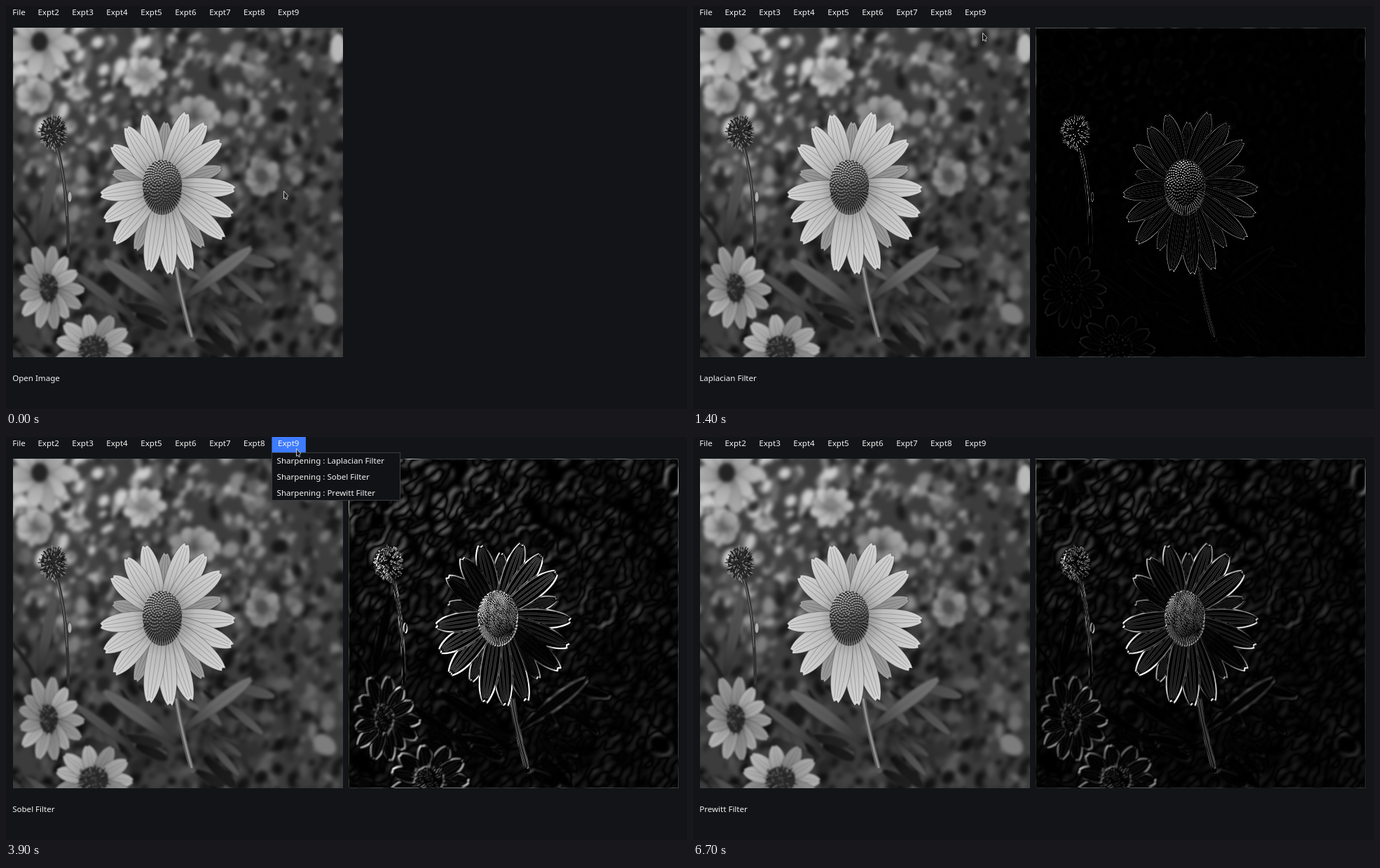
Write an HTML page with a canvas that moves like this. It is 972 by 576 pixels and loops after 6.8 s.

```html
<!DOCTYPE html>
<html lang="en">
<head>
<meta charset="utf-8">
<title>Sharpening filters</title>
<style>
html, body { margin: 0; width: 100%; height: 100%; overflow: hidden; background: #121418; }
canvas { position: absolute; left: 489px; top: 31px; }
#photo { left: 10px; }
svg { position: absolute; left: 0; top: 0; }
text { font: 11.55px "Noto Sans", sans-serif; fill: #f4f3f1; white-space: pre; }
</style>
</head>
<body>
<canvas id="photo"></canvas>
<svg id="ui" width="972" height="576" viewBox="0 0 972 576"></svg>
<script>
const SIZE = 471, PAD = 20, LOOP = 6800, TAU = Math.PI * 2;
const gray = (g, a = 1) => `rgba(${g},${g},${g},${a})`;

let seed = 11;
function rand(low = 0, high = 1) {
  seed = (seed * 1664525 + 1013904223) % 4294967296;
  return low + (high - low) * seed / 4294967296;
}
function repeat(n, draw) {
  for (let i = 0; i < n; i++) draw(i);
}

// ---------- photograph, drawn in stage coordinates ----------
const photo = document.getElementById('photo');
photo.width = photo.height = SIZE;
const view = photo.getContext('2d', { willReadFrequently: true });

function layer(blur, draw) {
  const c = document.createElement('canvas');
  c.width = c.height = SIZE + 2 * PAD;
  const g = c.getContext('2d');
  g.lineCap = 'round';
  g.translate(PAD - 10, PAD - 31);
  draw(g);
  view.filter = `blur(${blur}px)`;
  view.drawImage(c, -PAD, -PAD);
  view.filter = 'none';
}

function oval(g, x, y, rx, ry, tone, turn = 0) {
  g.fillStyle = gray(tone);
  g.beginPath();
  g.ellipse(x, y, rx, ry, turn, 0, TAU);
  g.fill();
}

function curve(g, x0, y0, cx, cy, x1, y1, width, color) {
  g.strokeStyle = color;
  g.lineWidth = width;
  g.beginPath();
  g.moveTo(x0, y0);
  g.quadraticCurveTo(cx, cy, x1, y1);
  g.stroke();
}

function petal(g, x0, y0, x1, y1, w, tone, veins = 0) {
  const len = Math.hypot(x1 - x0, y1 - y0);
  g.save();
  g.translate(x0, y0);
  g.rotate(Math.atan2(y1 - y0, x1 - x0));
  const fill = g.createLinearGradient(0, 0, len, 0);
  fill.addColorStop(0, gray(tone * .5));
  fill.addColorStop(.45, gray(tone * .88));
  fill.addColorStop(1, gray(tone));
  g.fillStyle = fill;
  g.strokeStyle = gray(40, .4);
  g.lineWidth = 1;
  g.beginPath();
  g.moveTo(0, -w * .2);
  g.bezierCurveTo(len * .4, -w * .62, len * .8, -w * .72, len, -w * .12);
  g.lineTo(len * .97, 0);
  g.lineTo(len * .99, w * .14);
  g.bezierCurveTo(len * .8, w * .72, len * .4, w * .62, 0, w * .2);
  g.fill();
  g.stroke();
  repeat(veins, i => {
    const off = (i - (veins - 1) / 2) * w * .26;
    curve(g, len * .25, off * .7, len * .6, off * 1.3, len * .94, off * .5, 1, gray(60, .28));
  });
  g.restore();
}

// ring of petals whose tips lie on a wobbly ellipse
function daisy(g, x, y, rx, ry, n, w, tone, veins = 0) {
  repeat(n, i => {
    const a = (i + rand(-.2, .2)) * TAU / n, r = rand(.85, 1.05);
    petal(g, x, y, x + rx * r * Math.cos(a), y + ry * r * Math.sin(a), w, tone * rand(.85, 1.1), veins);
  });
}

// seeds scattered over an oval, alternately light and dark
function seeds(g, x, y, rx, ry, n, light) {
  oval(g, x, y, rx, ry, 42);
  repeat(n, i => {
    const a = rand(0, TAU), r = Math.sqrt(rand()), c = Math.cos(a), s = Math.sin(a);
    const px = x + rx * r * c, py = y + ry * r * s;
    curve(g, px, py, px + c, py + s, px + 4 * r * c, py + 4 * r * s, 1.1, gray(i % 2 ? light : 22));
  });
}

// light in the upper left, darkest at the bottom
function toneAt(x, y) {
  const u = (x - 10) / SIZE, v = (y - 31) / SIZE;
  return 32 + 112 * Math.exp(-2 * u * u - 3.2 * v * v) + 25 * u * u;
}

function backdrop(g) {
  g.fillStyle = gray(60);
  g.fillRect(-PAD, 0, 540, 560);
  repeat(1500, () => {
    const x = rand(-10, 500), y = rand(10, 520), r = rand(4, 13);
    const tone = toneAt(x, y) * (.3 + 1.75 * rand() ** 1.5);
    oval(g, x, y, r * rand(.4, .9), r, Math.min(tone, 205), rand(-.3, 1.2));
  });
}

function farFlowers(g) {
  daisy(g, 48, 52, 52, 58, 10, 22, 195);
  oval(g, 48, 51, 12, 14, 35);
  daisy(g, 42, 128, 28, 28, 7, 24, 180);
  daisy(g, 196, 98, 33, 30, 9, 17, 200);
  oval(g, 197, 95, 9, 7, 130);
  daisy(g, 270, 155, 40, 28, 9, 20, 165);
  daisy(g, 365, 245, 27, 32, 9, 18, 145);
  oval(g, 365, 243, 9, 10, 75);
  oval(g, 474, 60, 11, 21, 185);
  oval(g, 455, 440, 18, 13, 125, .7);
}

function leaves(g) {
  repeat(26, () => {
    const x = rand(0, 320), y = rand(350, 500), a = rand(.2, 1.2), len = rand(40, 90);
    petal(g, x, y, x + len * Math.cos(a), y + len * Math.sin(a), rand(7, 15), rand(25, 100));
  });
  petal(g, 46, 342, 69, 228, 15, 85, 1);
  curve(g, 8, 295, 28, 315, 42, 345, 6, gray(30));
  petal(g, 255, 417, 352, 344, 17, 115, 1);
  petal(g, 242, 436, 138, 362, 18, 100, 1);
  petal(g, 184, 448, 98, 382, 12, 85, 1);
}

function nearFlowers(g) {
  daisy(g, 62, 402, 50, 62, 13, 18, 172, 2);
  seeds(g, 61, 403, 13, 20, 70, 115);
  daisy(g, 126, 490, 62, 55, 11, 21, 172, 2);
  seeds(g, 125, 490, 21, 19, 110, 145);
}

function seedHead(g) {
  curve(g, 73, 202, 88, 255, 89, 352, 4.5, gray(50));
  curve(g, 72, 202, 85, 245, 87, 300, 1, gray(125));
  oval(g, 91, 273, 2.5, 7, 175);
  seeds(g, 67, 181, 17, 23, 170, 145);
}

function mainFlower(g) {
  curve(g, 242, 365, 248, 415, 266, 477, 7, gray(85));
  curve(g, 243, 375, 249, 415, 265, 472, 3, gray(140));
  // every fourth petal sits behind, shorter and darker
  const ring = back => repeat(20, i => {
    if ((i % 4 === 1) !== back) return;
    const a = (i * 18 - 110) * TAU / 360, r = back ? .85 : 1;
    petal(g, 223, 256, 231 + 97 * r * Math.cos(a), 266 + 119 * r * Math.sin(a),
      back ? 20 : 25, back ? 160 : 214, 3);
  });
  ring(true);
  ring(false);
  // spiral of florets, lighter towards the top left
  oval(g, 223, 256, 28, 36, 45);
  repeat(240, i => {
    const r = Math.sqrt(i / 240), a = i * 2.39996, s = Math.sin(a);
    const x = 223 + 28 * r * Math.cos(a), y = 252 + r * s * (s > 0 ? 42 : 32);
    oval(g, x, y, 1.5, 1.2, Math.max(35, 185 - (y - 220) * 1.7 - (x - 223) * .9));
  });
  repeat(44, i => {
    const a = .2 + i / 44 * 2.7, c = Math.cos(a), s = Math.sin(a);
    const x = 223 + 26 * c, y = 259 + 35 * s;
    curve(g, x - 6 * c, y - 8 * s, x, y, x + 2 * c, y + 4 * s, 1.3, gray(i % 2 ? 22 : 100));
  });
}

layer(0, backdrop);
layer(3.2, backdrop);
layer(2.4, farFlowers);
layer(1.5, leaves);
layer(.8, nearFlowers);
layer(.4, seedHead);
layer(.4, mainFlower);

// ---------- edge filters computed from the photograph ----------
function filtered(kernel, gain, twoSided) {
  const src = view.getImageData(0, 0, SIZE, SIZE).data;
  const c = document.createElement('canvas');
  c.width = c.height = SIZE;
  const g = c.getContext('2d'), out = g.createImageData(SIZE, SIZE);
  const clamp = v => Math.max(0, Math.min(SIZE - 1, v));
  const at = (x, y) => {
    const px = clamp(x), py = clamp(y), v = src[(py * SIZE + px) * 4];
    return px === x && py === y ? v : v / 2;
  };
  for (let y = 0; y < SIZE; y++) for (let x = 0; x < SIZE; x++) {
    let sum = 0;
    for (let k = 0; k < 9; k++)
      if (kernel[k]) sum += kernel[k] * at(x + k % 3 - 1, y + Math.floor(k / 3) - 1);
    const v = gain * (twoSided ? Math.abs(sum) : Math.max(0, sum)), i = (y * SIZE + x) * 4;
    out.data[i] = out.data[i + 1] = out.data[i + 2] = v;
    out.data[i + 3] = 255;
  }
  g.putImageData(out, 0, 0);
  photo.after(c);
  return c;
}

const stages = [
  { from: 0, label: 'Open Image' },
  { from: 1400, label: 'Laplacian Filter', image: filtered([0, -1, 0, -1, 4, -1, 0, -1, 0], 1, false) },
  { from: 3400, label: 'Sobel Filter', image: filtered([-2, -2, 0, -2, 0, 2, 0, 2, 2], .45, true) },
  { from: 5100, label: 'Prewitt Filter', image: filtered([-2, -1, 0, -1, 0, 1, 0, 1, 2], .45, true) }
];

// ---------- interface ----------
const ui = document.getElementById('ui');
function add(parent, tag, attrs, content = '') {
  const el = document.createElementNS('http://www.w3.org/2000/svg', tag);
  for (const key in attrs) el.setAttribute(key, attrs[key]);
  el.textContent = content;
  return parent.appendChild(el);
}
const show = (el, on) => { el.style.display = on ? '' : 'none'; };

const STEP = 48.95, FIRST = 36.8;
const lit = add(ui, 'rect', { y: 0, height: 22, fill: '#3d7bff' });
add(ui, 'text', { x: 9.2, y: 13 }, 'File');
repeat(8, i => add(ui, 'text', { x: 45.4 + i * STEP, y: 13 }, `Expt${i + 2}`));
const status = add(ui, 'text', { x: 9.2, y: 536 });

const menu = add(ui, 'g', {});
add(menu, 'rect', { x: 379.5, y: 22.5, width: 183, height: 68, fill: '#101216', stroke: '#3b3d42' });
const pick = add(menu, 'rect', { x: 379.5, width: 183.5, height: 22, rx: 2, fill: '#1d2f5d', stroke: '#4680fa' });
['Laplacian', 'Sobel', 'Prewitt'].forEach((name, i) =>
  add(menu, 'text', { x: 386.6, y: 38 + 23 * i }, `Sharpening : ${name} Filter`));

const cursor = add(ui, 'path', {
  d: 'M.5 .5V11.5L2.6 10 4 12.6 5.6 11.8 4.7 9.2 6.8 7.4Z',
  fill: '#15171b', 'fill-opacity': .6, stroke: '#d8d8d8', 'stroke-width': .9
});

// start, number of 100 ms steps, end x, end y
const moves = [
  [100, 5, 415, 16], [900, 3, 413, 38], [2000, 4, 415, 15], [3400, 1, 411, 44],
  [3500, 4, 414, 16], [4200, 5, 407, 79], [5700, 7, 32, -11], [6400, 1, 32, -20]
];
function cursorAt(t) {
  let x = 396, y = 264;
  for (const [start, steps, endX, endY] of moves) {
    if (t < start) break;
    const p = Math.min(1, ((t - start) / 100 + 1) / steps);
    x += (endX - x) * p;
    y += (endY - y) * p;
  }
  return [x, y];
}

const openTimes = [[700, 1400], [2400, 3400], [3900, 5100]];

function render(time) {
  const t = Math.floor(time % LOOP / 100) * 100;
  const [x, y] = cursorAt(t);
  const open = openTimes.some(([a, b]) => t >= a && t < b);
  const inBar = y >= 0 && y < 22 && x < 428;
  const stage = stages.filter(s => t >= s.from).pop();

  for (const s of stages) if (s.image) show(s.image, s === stage);
  status.textContent = stage.label;

  const button = open ? 8 : x < FIRST ? 0 : 1 + Math.floor((x - FIRST) / STEP);
  show(lit, open || inBar);
  lit.setAttribute('x', button ? FIRST + (button - 1) * STEP : 0);
  lit.setAttribute('width', button ? STEP - .5 : FIRST);

  const row = Math.floor((y - 22) / 23);
  show(menu, open);
  show(pick, row >= 0 && row < 3);
  pick.setAttribute('y', 22.5 + row * 23);
  cursor.setAttribute('transform', `translate(${x} ${y})`);
}

const began = performance.now();
function tick() {
  render(performance.now() - began);
  requestAnimationFrame(tick);
}
tick();
</script>
</body>
</html>
```
